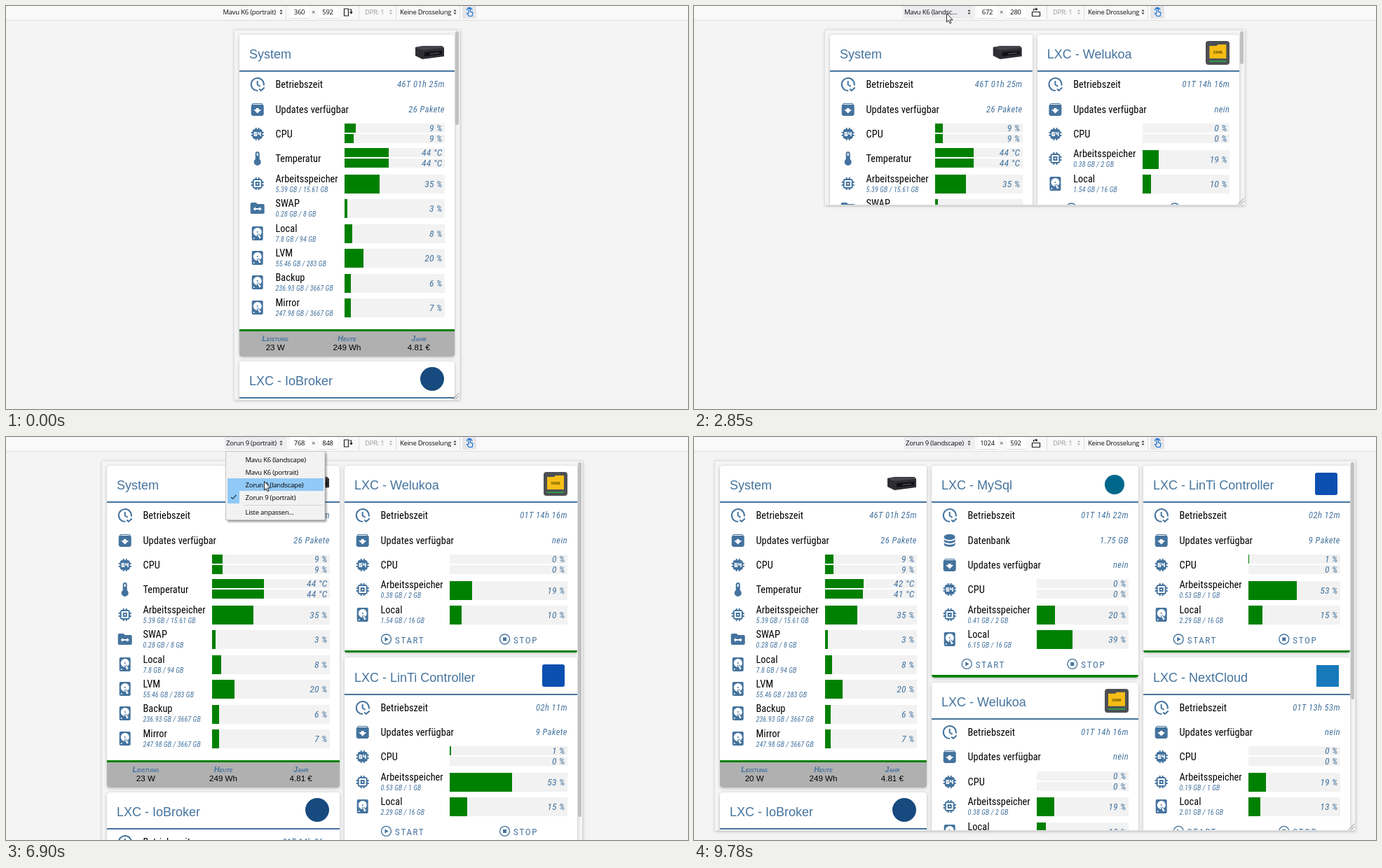
An HTML page with a canvas that plays this animation: 973x576 px, repeating every 9850 ms.

```html
<!DOCTYPE html>
<html lang="de">
<head>
<meta charset="utf-8">
<title>Responsive Dashboard</title>
<style>
html, body { margin: 0; width: 973px; height: 576px; overflow: hidden; background: #f4f4f4; }
canvas { display: block; }
</style>
</head>
<body>
<canvas id="stage" width="973" height="576"></canvas>
<script>
const LOOP = 9850, BLUE = '#44739e', GREEN = '#008000', ROW = 35.4;
const ARIAL = '"Liberation Sans", Arial, sans-serif';
const UI = '9.5px "Open Sans", sans-serif';
const NARROW = '"Roboto Condensed", Roboto, sans-serif';
const g = document.getElementById('stage').getContext('2d');

// Use a real condensed face if there is one, otherwise narrow the regular face evenly.
const narrow = (px, style = '') => `${style} condensed ${px}px ${NARROW}`;
const measure = font => (g.font = font, g.measureText('Arbeitsspeicher').width);
const squeeze = measure(narrow(20)) > 0.95 * measure('20px Roboto, sans-serif') ? 0.885 : 1;

function text(s, x, y, font, color, align = 'left', spacing = 0) {
  g.save();
  g.font = font;
  g.fillStyle = color;
  g.textAlign = align;
  g.letterSpacing = spacing + 'px';
  g.translate(x, Math.round(y));
  if (font.includes('Condensed')) g.scale(squeeze, 1);
  g.fillText(s, 0, 0);
  g.restore();
}

const uiText = (s, x, y, color = '#0c0c0d', align = 'left') => text(s, x, y, UI, color, align, -0.25);

// Boxes snap to whole pixels, as page layout does.
function box(x, y, w, h, color, radius = 0) {
  const left = Math.round(x), top = Math.round(y);
  g.fillStyle = color;
  g.beginPath();
  g.roundRect(left, top, Math.round(x + w) - left, Math.round(y + h) - top, radius);
  g.fill();
}

function path(d, x, y, fill, stroke, width = 1) {
  const p = new Path2D(d);
  g.save();
  g.translate(x, y);
  if (fill) { g.fillStyle = fill; g.fill(p, 'evenodd'); }
  if (stroke) { g.strokeStyle = stroke; g.lineWidth = width; g.stroke(p); }
  g.restore();
}

function disc(x, y, r, color) {
  g.fillStyle = color;
  g.beginPath();
  g.arc(x, y, r, 0, 7);
  g.fill();
}

// Row icons on a 24 unit grid
const CHIP = 'M9 3V5H7L5 7V9H3V11H5V13H3V15H5V17L7 19H9V21H11V19H13V21H15V19H17L19 17V15H21V13H19V11H21V9H19V7L17 5H15V3H13V5H11V3Z';
const ICONS = {
  clock: 'M12.5 21A9 9 0 1 1 21 13.5M12 7V12.5L16 14.8M14.5 18.5L17.2 21L22 16.5',
  pack: 'M3 6.5L5.5 3H18.5L21 6.5V19L19 21H5L3 19ZM5.2 5H18.8L18 4H6ZM12 17.5L17.5 12H14V10H10V12H6.5Z',
  cpu: CHIP + 'M7 9H11.5V10.5H8.5V11.2H11.5V15H7ZM8.5 12.5V13.5H10V12.5ZM12.5 9H14V11H15.5V9H17V15H15.5V12.5H12.5Z',
  memory: CHIP + 'M7 7H17V17H7ZM9 9H15V15H9ZM11 11V13H13V11Z',
  thermo: 'M15 13V5A3 3 0 0 0 9 5V13A5 5 0 1 0 15 13ZM11 8V5A1 1 0 0 1 13 5V8Z',
  swap: 'M2 6A2 2 0 0 1 4 4H10L12 6H20A2 2 0 0 1 22 8V18A2 2 0 0 1 20 20H4A2 2 0 0 1 2 18ZM6 13L9 16V14H15V16L18 13L15 10V12H9V10Z',
  disk: 'M6 2H18A2 2 0 0 1 20 4V20A2 2 0 0 1 18 22H6A2 2 0 0 1 4 20V4A2 2 0 0 1 6 2ZM12 4A6 6 0 1 0 12 16L11 13.5L13.8 12.3L15.7 14.7A6 6 0 0 0 12 4ZM11 10A1 1 0 1 0 13 10A1 1 0 1 0 11 10ZM6 19A1 1 0 1 0 8 19A1 1 0 1 0 6 19ZM12.1 13.3L14.6 19.6L17.2 18.1L13 12.8Z',
  data: 'M12 3C1.4 3 1.4 11 12 11S22.6 3 12 3ZM4 9V12C4 17.2 20 17.2 20 12V9C20 14.2 4 14.2 4 9ZM4 14V17C4 22.2 20 22.2 20 17V14C20 19.2 4 19.2 4 14Z'
};

// Header pictures, placed from the top right corner of a card
const PICTURES = {
  pc(x, y) {
    path('M-56 18L-45 16H-18L-15 19V31L-46 35L-56 30Z', x, y, '#2f2d34');
    path('M-56 18L-45 16H-18L-15 19L-46 22Z', x, y, '#47434d');
    path('M-43 25L-18 23V28L-43 31Z', x, y, '#111115');
    path('M-35 27.5L-22 26', x, y, null, '#666670');
  },
  broker: (x, y) => disc(x - 32, y + 25, 17, '#174a7e'),
  mysql: (x, y) => disc(x - 34, y + 27, 14, '#00678c'),
  cloud: (x, y) => box(x - 48, y + 11, 32, 31, '#1779ba'),
  wlan: (x, y) => box(x - 50, y + 10, 32, 32, '#0b4fb0', 3),
  share(x, y) {
    box(x - 48, y + 9, 34, 34, '#4c5054', 4);
    path('M-43 16H-33L-31 14H-19V34H-43Z', x, y, '#f6bd16');
    text('SMB', x - 31, y + 27, 'bold 6px ' + ARIAL, '#6b5200', 'center');
    path('M-43 38H-19', x, y, null, '#25b34b', 1.5);
  }
};

const uptime = v => ['clock', 'Betriebszeit', v];
const updates = v => ['pack', 'Updates verfügbar', v];
const cpu = (v, settling) => ['cpu', 'CPU', v, '', settling];
const ram = (v, sub) => ['memory', 'Arbeitsspeicher', [v], sub];
const disk = (label, v, sub) => ['disk', label, [v], sub];

function makeCards(t) {
  const late = t > 8900, settling = Math.max(0, 2 - Math.floor((t + 10) / 80));
  return {
    system: { title: 'System', picture: 'pc', power: late ? '20 W' : '23 W', rows: [
      uptime('46T 01h 25m'), updates('26 Pakete'), cpu([9, 9], settling),
      ['thermo', 'Temperatur', late ? [42, 41] : [44, 44]],
      ram(35, '5.39 GB / 15.61 GB'), ['swap', 'SWAP', [3], '0.28 GB / 8 GB'],
      disk('Local', 8, '7.8 GB / 94 GB'), disk('LVM', 19.2, '55.46 GB / 283 GB'),
      disk('Backup', 6, '236.93 GB / 3667 GB'), disk('Mirror', 6.2, '247.98 GB / 3667 GB')] },
    broker: { title: 'LXC - IoBroker', picture: 'broker', rows: [uptime('01T 14h 06m'), updates('nein')] },
    mysql: { title: 'LXC - MySql', picture: 'mysql', rows: [
      uptime('01T 14h 22m'), ['data', 'Datenbank', '1.75 GB'], updates('nein'), cpu([0, 0]),
      ram(20, '0.41 GB / 2 GB'), disk('Local', 39, '6.15 GB / 16 GB')] },
    share: { title: 'LXC - Welukoa', picture: 'share', rows: [
      uptime('01T 14h 16m'), updates('nein'), cpu([0, 0]),
      ram(19, '0.38 GB / 2 GB'), disk('Local', 10, '1.54 GB / 16 GB')] },
    wlan: { title: 'LXC - LinTi Controller', picture: 'wlan', rows: [
      uptime(t < 7600 ? '02h 11m' : '02h 12m'), updates('9 Pakete'), cpu([1, 0]),
      ram(53, '0.53 GB / 1 GB'), disk('Local', 15, '2.29 GB / 16 GB')] },
    cloud: { title: 'LXC - NextCloud', picture: 'cloud', rows: [
      uptime('01T 13h 53m'), updates('nein'), cpu([0, 0]),
      ram(19, '0.19 GB / 1 GB'), disk('Local', 13, '2.01 GB / 16 GB')] }
  };
}

// "settling" is the extra width of the first bar while it eases to its value.
function drawRow([icon, label, value, sub, settling = 0], x, cy, w) {
  const outlined = icon === 'clock';
  path(ICONS[icon], x + 13.7, Math.round(cy) - 12, outlined ? null : BLUE, outlined ? BLUE : null, 2);
  text(label, x + 51.5, sub ? cy - 2 : cy + 5, narrow(14.3), '#000', 'left', 0.05);
  if (sub) text(sub, x + 51.5, cy + 12, narrow(10, 'italic'), BLUE, 'left', 0.1);
  if (typeof value === 'string') {
    text(value, x + w - 14, cy + 4, narrow(12.5, 'italic'), BLUE, 'right', 0.45);
    return;
  }
  const pair = value.length > 1, unit = icon === 'thermo' ? ' °C' : ' %', full = w - 164;
  value.forEach((v, i) => {
    const y = Math.round(pair ? cy - 15 + 15 * i : cy - 12.8), h = pair ? 13 : 27;
    const shown = i ? v : v + settling;
    box(x + 150, y, full, h, '#f2f2f2');
    box(x + 150, y, full * shown / 100, h, GREEN);
    text(Math.ceil(v) + unit, x + w - 17.5, y + h / 2 + 4.7, narrow(13.6, 'italic'), BLUE, 'right', 0.2);
  });
}

function drawButton(label, x, cy, half, mark) {
  path('M-7 0A7 7 0 1 0 7 0A7 7 0 1 0 -7 0Z', x - half + 7.5, cy - 0.5, null, BLUE, 1.4);
  path(mark, x - half + 7.5, cy - 0.5, BLUE);
  text(label, x - half + 20, cy + 5, narrow(13), BLUE, 'left', 1.7);
}

const cardHeight = card => card.power ? 460 : 90.4 + ROW * card.rows.length;

function drawCard(card, x, y, w) {
  const h = cardHeight(card);
  g.save();
  g.shadowColor = 'rgba(0,0,0,.25)';
  g.shadowBlur = 4;
  g.shadowOffsetY = 1;
  box(x, y, w, h, '#fff', 4);
  g.restore();
  g.save();
  g.beginPath();
  g.roundRect(x, y, w, h, 4);
  g.clip();
  text(card.title, x + 14, y + 34.3, '18px ' + ARIAL, BLUE);
  PICTURES[card.picture](x + w, y);
  box(x, y + 51.3, w, 2, BLUE);
  card.rows.forEach((r, i) => drawRow(r, x, y + 71.2 + ROW * i, w));
  if (card.power) {
    box(x, y + 420.5, w, 3.5, GREEN);
    box(x, y + 424, w, 36, '#b0b0b0');
    [['Leistung', card.power], ['Heute', '249 Wh'], ['Jahr', '4.81 €']].forEach(([name, v], i) => {
      const cx = x + w * (2 * i + 1) / 6;
      text(name, cx, y + 438, 'italic small-caps bold 10.7px ' + ARIAL, BLUE, 'center');
      text(v, cx, y + 451, '11.6px ' + ARIAL, '#000', 'center');
    });
  } else {
    const cy = y + 71.5 + ROW * card.rows.length;
    drawButton('START', x + w / 4, cy, 31, 'M-2 -3.2L3.2 0L-2 3.2Z');
    drawButton('STOP', x + w * 3 / 4, cy, 28, 'M-2.5 -2.5H2.5V2.5H-2.5Z');
    box(x, y + h - 3.5, w, 3.5, GREEN);
  }
  g.restore();
}

const DEVICES = ['Mavu K6 (landscape)', 'Mavu K6 (portrait)', 'Zorun 9 (landscape)', 'Zorun 9 (portrait)'];
const SCREENS = {
  phoneTall: { device: 1, labelX: 309.5, size: [360, 592], x: 325.5, w: 322, bottom: 563 },
  phoneWide: { device: 0, labelX: 300, size: [672, 280], x: 186.5, w: 599.5, bottom: 284.5 },
  tabletTall: { device: 3, labelX: 314, size: [768, 848], x: 136.5, w: 686, bottom: 790 },
  tabletWide: { device: 2, labelX: 302, size: [1024, 592], x: 29.5, w: 914, bottom: 562.5 }
};
const ONE = [['system', 'broker']];
const TWO = [['system', 'broker'], ['share', 'wlan']];
const THREE = [['system', 'broker'], ['mysql', 'share'], ['wlan', 'cloud']];
// start time, screen, columns, card width, end of the scroll thumb
const VIEWS = [
  [0, 'phoneTall', ONE, 307, 170],
  [1925, 'phoneWide', ONE, 307, 170],
  [2230, 'phoneWide', TWO, 288.7, 83],
  [4710, 'tabletTall', TWO, 332, 543],
  [7600, 'tabletWide', TWO, 332, 543],
  [7980, 'tabletWide', THREE, 295, 375]
];

function drawPage([, name, columns, cardW, thumbEnd], t) {
  const s = SCREENS[name], h = s.bottom - 34, cards = makeCards(t);
  g.save();
  g.shadowColor = 'rgba(0,0,0,.25)';
  g.shadowBlur = 4;
  g.shadowOffsetY = 1;
  box(s.x, 34, s.w, h, '#f5f5f5');
  g.restore();
  g.save();
  g.beginPath();
  g.rect(s.x, 34, s.w, h);
  g.clip();
  columns.forEach((names, i) => {
    let y = 41;
    for (const key of names) {
      drawCard(cards[key], s.x + 7.5 + i * (cardW + 7), y, cardW);
      y += cardHeight(cards[key]) + 7;
    }
  });
  box(s.x + 8 + columns.length * (cardW + 7) - 7, 36, 5.5, thumbEnd - 36, '#c1c1c1', 2.5);
  path('M-10 -1L-1 -10M-6 -1L-1 -6', s.x + s.w, s.bottom, null, '#8a8a8a');
  g.restore();
  g.strokeStyle = '#e2e2e2';
  g.strokeRect(s.x, 34, s.w, h);
}

function drawToolbar(s, t) {
  const arrows = (x, color) => path('M-2 -1L0 -3.5L2 -1ZM-2 1L0 3.5L2 1Z', x, 8.5, color);
  box(0, 0, 973, 20, '#f9f9fa');
  box(0, 19.5, 973, 1, '#dedee0');
  if (t > 850) box(s.labelX - 2, 0, 398 - s.labelX + 2, 18, '#ededf0');
  for (const x of [399, 503, 556, 647]) box(x, 0, 1, 19, '#e0e0e2');
  uiText(s.device ? DEVICES[s.device] : DEVICES[0].slice(0, 15) + '...', s.labelX, 11.5);
  arrows(392.5, '#333');
  for (const [x, w] of [[405, 28], [446, 27]]) {
    box(x, 0, w, 17, '#fff');
    box(x, 17, w, 1, '#dcdcde');
  }
  uiText(s.size[0], 418.5, 12, '#0c0c0d', 'center');
  uiText('×', 438.5, 12, '#444', 'center');
  uiText(s.size[1], 459, 12, '#0c0c0d', 'center');
  path(s.size[0] < s.size[1]
    ? 'M482.5 4H488.5V14H482.5ZM490 5H492.5V10M490.8 8.5L492.5 10.5L494.2 8.5'
    : 'M482.5 8.5H493.5V14.5H482.5ZM484.5 7V4.5H489M487.5 2.8L489.5 4.5L487.5 6.2', 0, 0, null, '#222', 1.2);
  uiText('DPR: 1', 512, 11.5, '#9a9a9c');
  arrows(549, '#aaa');
  uiText('Keine Drosselung', 562, 11.5);
  arrows(640.5, '#333');
  box(651, 0, 20, 18, '#e6e6e9');
  path('M660 10V4.5A1.2 1.2 0 0 1 662.4 4.5V8L666 9.3L665 14.5H660.5L657.5 10.5ZM657.5 6A3.6 3.6 0 0 1 664.8 6', 0, 0, null, '#0a6cd6', 1.1);
}

// open, close, left edge
const MENUS = [[1000, 1850, 309.5], [3230, 4630, 299.5], [6300, 7600, 313.5]];

function drawMenu(t, device, cursor) {
  const menu = MENUS.find(([open, close]) => t >= open && t < close);
  if (!menu) return;
  const [open, , x] = menu, rowTop = i => 23 + 18 * i;
  const hovered = cursor && cursor[1] >= 23 ? Math.min(3, Math.floor((cursor[1] - 23) / 18)) : device;
  g.save();
  g.globalAlpha = Math.min(1, 0.4 + (t - open) / 250);
  g.save();
  g.shadowColor = 'rgba(0,0,0,.45)';
  g.shadowBlur = 3;
  g.shadowOffsetX = g.shadowOffsetY = 2;
  box(x, 20.5, 141.5, 98, '#f2f2f2');
  g.restore();
  g.strokeStyle = '#c4c4c4';
  g.strokeRect(x, 20.5, 141.5, 98);
  box(x + 2.5, rowTop(hovered), 137, 18, '#91c9f7');
  box(x + 2.5, rowTop(device), 17, 18, '#91c9f7');
  path('M-3.5 0L-1 2.5L4 -3', x + 11, rowTop(device) + 9, null, '#1c3f66', 1.2);
  DEVICES.forEach((name, i) => uiText(name, x + 28, rowTop(i) + 12.5, '#000'));
  box(x + 25, 96.5, 114, 1, '#d5d5d5');
  uiText('Liste anpassen...', x + 28, 111, '#000');
  g.restore();
}

// Runs of [time, x, y]; the pointer is hidden between runs.
const POINTER = [
  [[300, 662, 462], [450, 510, 300], [600, 257, 120], [850, 385, 7], [1390, 385, 7], [1540, 367, 26],
   [2460, 367, 26], [2690, 361, 12], [2850, 360, 10], [3650, 360, 10], [3770, 388, 74], [4080, 389, 83], [5570, 389, 83]],
  [[5880, 389, 83], [6150, 374, 8], [6740, 374, 8], [6900, 368, 63], [7200, 364, 58], [7430, 374, 62],
   [7600, 374, 62], [7670, 374, 68], [7980, 374, 68], [8530, 610, 107], [8680, 640, 125], [9530, 955, 580]]
];

function pointerAt(t) {
  const run = POINTER.find(r => t >= r[0][0] && t < r[r.length - 1][0]);
  if (!run) return null;
  const i = run.findIndex(k => k[0] > t), a = run[i - 1], b = run[i];
  const p = (t - a[0]) / (b[0] - a[0]);
  return [a[1] + (b[1] - a[1]) * p, a[2] + (b[2] - a[2]) * p];
}

function draw(t) {
  const view = VIEWS.filter(v => v[0] <= t).pop(), screen = SCREENS[view[1]], cursor = pointerAt(t);
  box(0, 0, 973, 576, '#f4f4f4');
  drawPage(view, t);
  drawToolbar(screen, t);
  drawMenu(t, screen.device, cursor);
  if (cursor) path('M0.5 0.5V13L3.2 10.4L5 14.8L7 14L5.1 9.8H9Z', ...cursor, '#fff', '#111', 0.9);
}

const start = performance.now();
(function tick() {
  draw((performance.now() - start) % LOOP);
  requestAnimationFrame(tick);
})();
</script>
</body>
</html>
```
